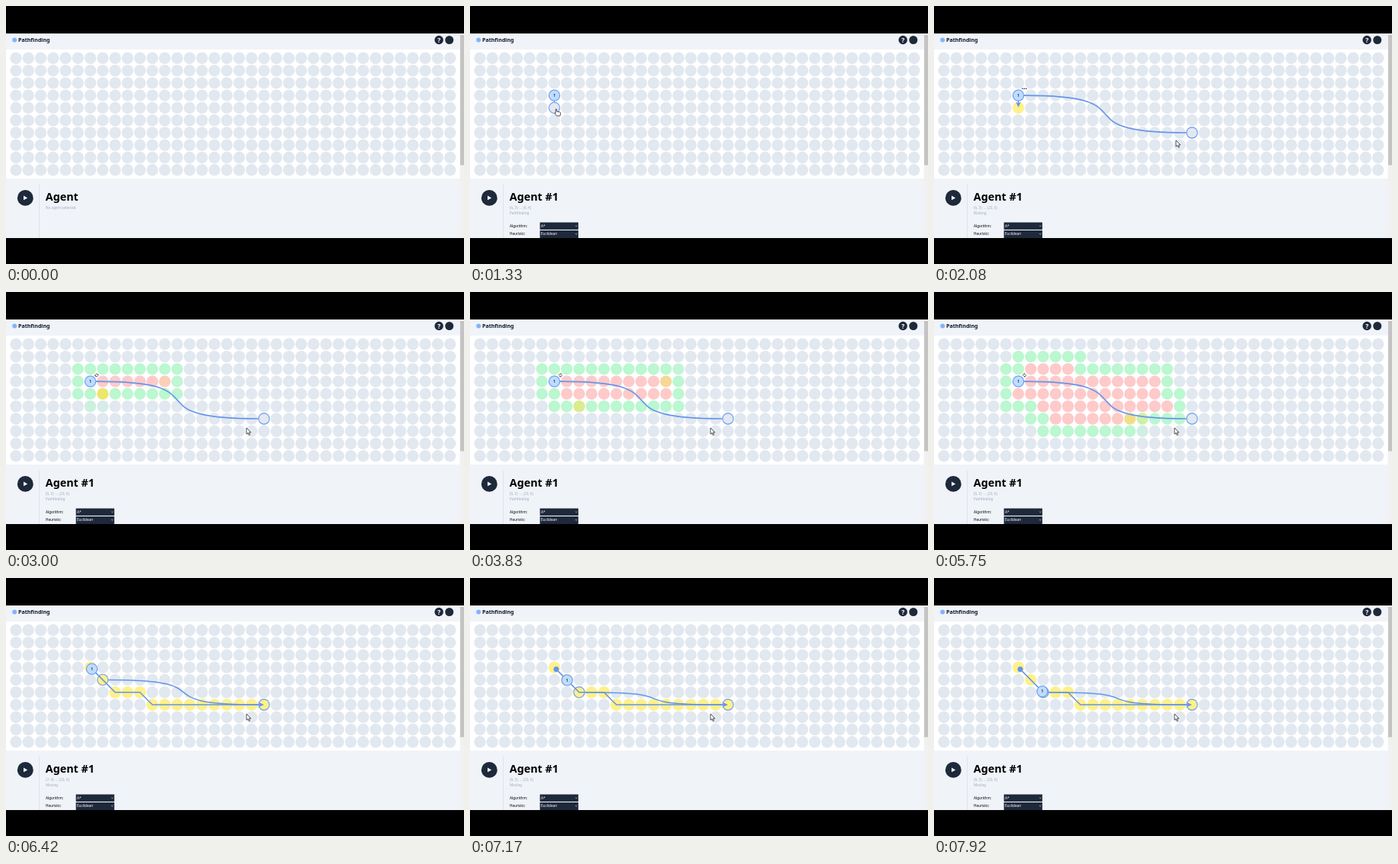
Write an HTML page that moves like this. It is 600x338 px and loops after 8 s.

```html
<!DOCTYPE html>
<html lang="en">
<head>
<meta charset="utf-8">
<title>Pathfinding</title>
<style>
html, body { margin: 0; width: 100%; height: 100%; overflow: hidden; background: #000; }
svg { display: block; width: 100%; height: 100%; font-family: "Noto Sans", "Open Sans", sans-serif; }
.dark { fill: #1e293b; }
.bold { font-weight: 700; }
.small { font-size: 4.65px; }
.muted { fill: #a3acba; }
.link { fill: none; stroke: #6495ed; stroke-width: 1.55; }
.head { fill: #6495ed; }
.ring { fill: none; stroke: #6a9df2; stroke-width: 1.1; }
</style>
</head>
<body>
<svg viewBox="0 0 600 338">
  <rect width="600" height="338" fill="#fff"/>
  <rect y="36" width="600" height="21" fill="#f0f4f9"/>
  <rect y="226" width="600" height="80" fill="#f0f4f9"/>

  <circle cx="11.2" cy="44.6" r="3" fill="#86b4f8"/>
  <text x="16" y="47.3" class="bold" font-size="7.05" fill="#0f172a">Pathfinding</text>
  <circle cx="567.2" cy="44.5" r="5.7" class="dark"/>
  <text x="567.2" y="47.6" class="bold" font-size="8.5" fill="#fff" text-anchor="middle">?</text>
  <circle cx="580.8" cy="44.5" r="5.5" class="dark"/>

  <g id="cells"></g>
  <path id="path" class="link"/>
  <circle id="tail" class="head" r="3.5"/>
  <path id="head" class="head" d="M-7 -3.3L0 0L-7 3.3L-5.4 0Z"/>
  <circle id="next" class="ring" r="7.1"/>
  <circle id="goal" class="ring" r="7.1"/>
  <path id="curve" class="link"/>
  <g id="agent">
    <circle r="7.1" fill="#bfdbfe" stroke="#659af0" stroke-width="1.1"/>
    <text y="1.8" class="bold" font-size="4.6" fill="#1e293b" text-anchor="middle">1</text>
  </g>
  <g id="dots" fill="#111">
    <circle cx="115.9" cy="108.3" r=".8"/><circle cx="118.3" cy="108.3" r=".8"/><circle cx="120.7" cy="108.3" r=".8"/>
  </g>
  <g id="spin" fill="none" stroke="#222" stroke-width=".65">
    <path d="M-1.8 -.5A1.9 1.9 0 0 1 1.6 -1M1.8 -2V-.8H.6M1.8 .5A1.9 1.9 0 0 1 -1.6 1M-1.8 2V.8H-.6"/>
  </g>

  <circle cx="25.3" cy="251.4" r="10.4" class="dark"/>
  <path d="M23 248.5L28.2 251.4L23 254.3Z" fill="#fff"/>
  <rect x="43" y="234" width="1.1" height="70" fill="#dfe5ed"/>
  <text id="title" x="51.8" y="255.2" class="bold" font-size="14.3"></text>
  <text id="where" x="52" y="266" class="small muted"></text>
  <text id="state" x="52" y="273.1" class="small muted"></text>
  <g id="form" class="small">
    <text x="52" y="289.8">Algorithm:</text>
    <text x="52" y="300.1">Heuristic:</text>
    <g class="dark"><rect x="91.6" y="283.5" width="50.3" height="9.4"/><rect x="91.6" y="294" width="50.3" height="12"/></g>
    <g fill="#fff"><text x="93" y="289.9">A*</text><text x="93" y="300.2">Euclidean</text></g>
    <path d="M138 287.6l1.2 1.2l1.2 -1.2M138 298l1.2 1.2l1.2 -1.2" fill="none" stroke="#fff" stroke-width=".6"/>
  </g>

  <rect x="594.6" y="36" width="5.4" height="268" fill="#f1f1f1"/>
  <rect x="595" y="38" width="5" height="170.5" fill="#c4c4c4"/>
  <g id="cursor" fill="#fff" stroke="#111" stroke-width=".7" stroke-linejoin="round">
    <path id="arrow" d="M0 0V8.2L1.9 6.5L3.2 9.4L4.6 8.8L3.3 6H5.9Z"/>
    <path id="hand" d="M-.8 .3Q0 -.5 .7 .3V3.2L4.6 4Q5.8 4.4 5.6 5.6L5 9H.6L-2 5.8Q-1.9 4.6 -.8 5.3Z"/>
  </g>
  <path d="M0 0H600V36H0ZM0 304H600V338H0Z"/>
</svg>
<script>
const LOOP = 8000, COLS = 36, ROWS = 10, FADE = 150;
const PLACED = 950, AIMED = 1180, READY = 1420, DROPPED = 1800;
const SEARCH = 2421, NODE = 71.5, LOOK = 8, FOUND = 6190, MOVE = 6320, STEP = 829;
const BASE = [226, 232, 240], OPEN = [187, 247, 208], CLOSED = [254, 202, 202];
const CURRENT = [253, 224, 71], ROUTE = [254, 240, 138];
const START = [6, 3], GOAL = [20, 6];
const ROUTE_CELLS = [START, [7, 4], [8, 5], [9, 5], [10, 5]];
for (let c = 11; c <= GOAL[0]; c++) ROUTE_CELLS.push([c, 6]);

const $ = id => document.getElementById(id);
const el = Object.fromEntries([...document.querySelectorAll('[id]')].map(e => [e.id, e]));
const px = c => 13 + c * 16.25;
const py = r => 68.3 + r * 16.28;
const set = (e, attrs) => { for (const k in attrs) e.setAttribute(k, attrs[k]); };
const show = (e, on) => e.setAttribute('visibility', on ? 'visible' : 'hidden');
const at = (e, x, y, extra = '') => e.setAttribute('transform', `translate(${x} ${y})${extra}`);
const mix = (a, b, k) => a + (b - a) * k;
const clamp = (v, lo, hi) => Math.min(hi, Math.max(lo, v));

// cubic-bezier(.4, 0, .2, 1)
function ease(x) {
  if (x <= 0 || x >= 1) return clamp(x, 0, 1);
  let lo = 0, hi = 1, s;
  for (let i = 0; i < 14; i++) {
    s = (lo + hi) / 2;
    const v = 1.2 * s * (1 - s) ** 2 + 0.6 * s * s * (1 - s) + s ** 3;
    if (v < x) lo = s; else hi = s;
  }
  return 3 * s * s * (1 - s) + s ** 3;
}

const cells = [];
for (let r = 0; r < ROWS; r++) for (let c = 0; c < COLS; c++) {
  const node = document.createElementNS('http://www.w3.org/2000/svg', 'circle');
  set(node, { cx: px(c), cy: py(r), r: 7.7, fill: `rgb(${BASE})` });
  el.cells.append(node);
  cells.push({ node, c, r, events: [], g: Infinity, closed: false });
}
const cell = (c, r) => c >= 0 && r >= 0 && c < COLS && r < ROWS ? cells[r * COLS + c] : null;
const paint = (n, time, color) => n.events.push({ time, color });

// A* with Euclidean heuristic; each expansion becomes timed colour changes
function search() {
  const cost = n => n.g + Math.hypot(GOAL[0] - n.c, GOAL[1] - n.r);
  const first = cell(...START), goal = cell(...GOAL), open = [first];
  first.g = 0;
  for (let t = SEARCH; open.length && t < FOUND; t += NODE) {
    const n = open.reduce((a, b) => cost(b) < cost(a) - 1e-9 ? b : a);
    open.splice(open.indexOf(n), 1);
    if (n === goal) break;
    n.closed = true;
    if (n !== first) {
      paint(n, t, CURRENT);
      paint(n, t + NODE, CLOSED);
    }
    let look = t;
    for (let dc = -1; dc <= 1; dc++) for (let dr = -1; dr <= 1; dr++) {
      if (!dc && !dr) continue;
      look += LOOK;
      const m = cell(n.c + dc, n.r + dr), g = n.g + Math.hypot(dc, dr);
      if (!m || m.closed || g >= m.g - 1e-9) continue;
      if (m.g === Infinity) {
        open.push(m);
        paint(m, look, OPEN);
      }
      m.g = g;
    }
  }
}

paint(cell(6, 4), READY, ROUTE);
paint(cell(6, 4), SEARCH, BASE);
search();
for (const n of cells) if (n.events.length) paint(n, FOUND, BASE);
for (const p of ROUTE_CELLS) paint(cell(...p), FOUND, ROUTE);
const lively = cells.filter(n => n.events.length);
for (const n of lively) n.events.sort((a, b) => a.time - b.time);

function colorAt(events, t) {
  let color = BASE;
  events.forEach((e, i) => {
    if (e.time > t) return;
    const end = i + 1 < events.length ? Math.min(t, events[i + 1].time) : t;
    const k = ease((end - e.time) / FADE);
    color = color.map((v, j) => mix(v, e.color[j], k));
  });
  return color.map(Math.round);
}

const MOUSE = [[300, 100, 240], [850, 111, 120], [1000, 111, 120], [1200, 113, 135], [1400, 113, 135],
  [1800, 338, 168], [2040, 317, 176], [2300, 317, 176], [2450, 315, 178], [LOOP, 315, 178]];
function mouseAt(t) {
  const i = clamp(MOUSE.findIndex(k => k[0] > t), 1, MOUSE.length - 1);
  const [a, b] = [MOUSE[i - 1], MOUSE[i]];
  const k = ease((t - a[0]) / (b[0] - a[0]));
  return [mix(a[1], b[1], k), mix(a[2], b[2], k)];
}

function goalAt(t, [x, y]) {
  if (t < AIMED) return null;
  if (t < READY) return [6, 4];
  if (t >= DROPPED) return GOAL;
  return [clamp(Math.round((x - 13) / 16.25), 6, 20), clamp(Math.round((y - 68.3) / 16.28), 4, 6)];
}

function curve([c1, r1], [c2, r2]) {
  if (c1 === c2) return `M${px(c1)} ${py(r1) + 7.5}V${py(r2) - 7.5}`;
  const x1 = px(c1) + 7.5, x2 = px(c2) - 7.3, y1 = py(r1), y2 = py(r2), d = (x2 - x1) * 0.8;
  return `M${x1} ${y1}C${x1 + d} ${y1} ${x2 - d} ${y2} ${x2} ${y2}`;
}

function stateAt(t) {
  if (t < PLACED) return '';
  if (t < AIMED) return 'Idle';
  if (t < READY) return 'Pathfinding';
  if (t < SEARCH) return 'Waiting';
  return t < FOUND ? 'Pathfinding' : 'Moving';
}

function draw(t) {
  for (const n of lively) n.node.setAttribute('fill', `rgb(${colorAt(n.events, t)})`);

  const mouse = mouseAt(t), goal = goalAt(t, mouse);
  const placed = t >= PLACED, found = t >= FOUND, moving = t >= MOVE;
  const waiting = t >= READY && t < SEARCH;

  const leg = moving ? Math.floor((t - MOVE) / STEP) : 0;
  const k = moving ? (t - MOVE) / STEP - leg : 0;
  const from = ROUTE_CELLS[leg], to = ROUTE_CELLS[leg + 1];
  const here = moving ? to : START;

  show(el.agent, placed);
  at(el.agent, px(mix(from[0], to[0], k)), py(mix(from[1], to[1], k)));
  show(el.next, moving);
  set(el.next, { cx: px(here[0]), cy: py(here[1]) });

  show(el.goal, goal);
  show(el.curve, goal);
  if (goal) {
    set(el.goal, { cx: px(goal[0]), cy: py(goal[1]) });
    set(el.curve, { d: curve(here, goal) });
  }

  show(el.path, found || waiting);
  show(el.head, found || waiting);
  show(el.tail, found);
  if (found) {
    const pts = ROUTE_CELLS.slice(1, -1).map(p => `${px(p[0])} ${py(p[1])}`);
    set(el.path, { d: `M113 119.6L${pts.join('L')}H${px(GOAL[0]) - 5}` });
    set(el.tail, { cx: 113, cy: 119.6 });
    at(el.head, px(GOAL[0]), py(GOAL[1]));
  } else if (waiting) {
    set(el.path, { d: `M${px(6)} ${py(3)}V${py(4) - 5}` });
    at(el.head, px(6), py(4) - 0.6, ' rotate(90)');
  }

  show(el.dots, waiting);
  show(el.spin, t >= SEARCH && !found);
  at(el.spin, 118.6, 109, ` rotate(${(t - SEARCH) * 0.36})`);

  const pos = p => `(${p[0]}, ${p[1]})`;
  el.title.textContent = placed ? 'Agent #1' : 'Agent';
  el.where.textContent = !placed ? 'No agent selected' : goal ? `${pos(here)} → ${pos(goal)}` : pos(here);
  el.state.textContent = stateAt(t);
  show(el.form, placed);

  const hand = t < 1990, pointer = t >= MOUSE[0][0];
  at(el.cursor, ...mouse);
  show(el.hand, pointer && hand);
  show(el.arrow, pointer && !hand);
}

const begin = performance.now();
function frame() {
  draw((performance.now() - begin) % LOOP);
  requestAnimationFrame(frame);
}
frame();
</script>
</body>
</html>
```
